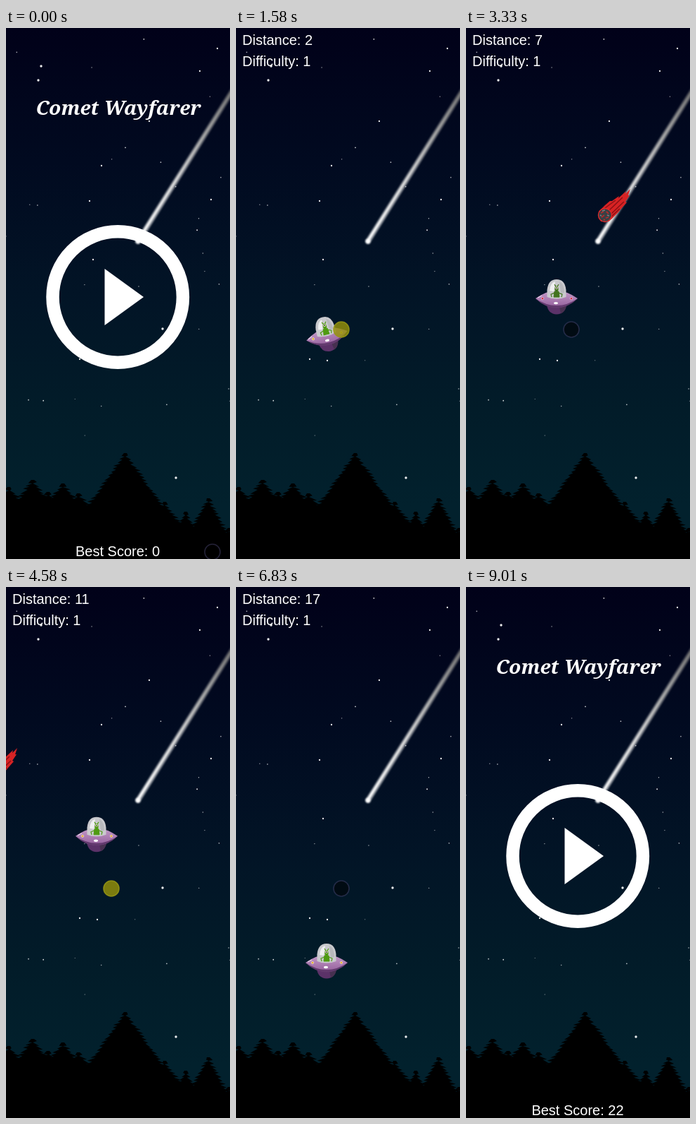
Write an HTML page that moves like this. It is 319 px wide and 752 px high and loops after 9410 ms.

```html
<!DOCTYPE html>
<html lang="en">
<head>
<meta charset="utf-8">
<title>Comet Wayfarer</title>
<style>
  html, body { margin: 0; width: 100%; height: 100%; overflow: hidden; background: #000; }
  svg { display: block; }
  text { font: 20px "Liberation Sans", Arial, sans-serif; fill: #fff; }
  #name { font: italic bold 28px "Noto Serif", serif; }
</style>
</head>
<body>
<svg width="319" height="752" viewBox="0 0 319 752">
  <defs>
    <linearGradient id="sky" x2="0" y2="1">
      <stop offset="0" stop-color="#010119"/>
      <stop offset=".25" stop-color="#010a20"/>
      <stop offset=".5" stop-color="#021426"/>
      <stop offset=".72" stop-color="#021c29"/>
      <stop offset=".9" stop-color="#02212d"/>
    </linearGradient>
    <linearGradient id="tail" gradientUnits="userSpaceOnUse" x1="187" y1="302" x2="321" y2="92">
      <stop offset="0" stop-color="#fff"/>
      <stop offset=".4" stop-color="#ddd"/>
      <stop offset="1" stop-color="#777"/>
    </linearGradient>
    <linearGradient id="hull" x2="0" y2="1">
      <stop offset="0" stop-color="#c49ac8"/>
      <stop offset="1" stop-color="#94609c"/>
    </linearGradient>
    <filter id="soft" filterUnits="userSpaceOnUse" x="0" y="0" width="340" height="752">
      <feGaussianBlur stdDeviation=".9"/>
    </filter>
  </defs>

  <rect width="319" height="752" fill="url(#sky)"/>
  <g id="stars" fill="#fff"></g>
  <g filter="url(#soft)" fill="none" stroke="url(#tail)" stroke-linecap="round">
    <path d="M188 302L328 80" stroke-width="7.5" opacity=".55"/>
    <path d="M188 301L328 80" stroke-width="3.4"/>
    <circle cx="188" cy="302" r="2.2" stroke-width="3"/>
  </g>
  <path id="trees"/>

  <g id="game">
    <g id="rock">
      <path d="M-9-5L0-14 7-20 10-20 20-27 19-24 30-34 29-30 36-37 33-28 35-28 29-19 31-18 23-9 19-4 10 5 5 9-6 9Z" fill="#d82324"/>
      <path d="M5-6L25-25M9-2L27-19M0-10L15-21M8 3L21-9" stroke="#8c1116" stroke-width="1.5"/>
      <circle r="9.5" fill="#394044" stroke="#e5292a" stroke-width="1.3"/>
      <path d="M-6-3L-2-5M2-5L5-2M-5 3L-1 0M1 4L5 3M-2 6L0 7" stroke="#b52a2c" stroke-width="1.8"/>
      <path d="M-4-6L0-7M-7 0L-5 1M3 0L6 1" stroke="#788184" stroke-width="1.5"/>
    </g>
    <g id="ship">
      <path d="M-14 11Q-12 24 0 24.500Q12 24 14 11Z" fill="#5b3268"/>
      <path d="M4 13H14Q12 21 6 23.500Z" fill="#473050"/>
      <path d="M-30 2Q-14-9 0-9Q14-9 30 2Q16 15 0 15Q-16 15-30 2Z" fill="url(#hull)"/>
      <path d="M-30 2Q-16 12 0 12Q16 12 30 2Q16 15.500 0 15.500Q-16 15.500-30 2Z" fill="#633a6e"/>
      <path d="M-13.500 0V-10Q-12-25 0-25Q12-25 13.500-10V0Q0 5-13.500 0Z" fill="#c9c9cd"/>
      <path d="M-10-9Q-9-20-2-22L-4-8Z" fill="#efeff0"/>
      <path d="M4-22Q11-18 11-6L6-5Z" fill="#b7b8bc"/>
      <g id="alien" fill="#4f9a12" stroke="#4f9a12">
        <path d="M-4 0L-3-8H3L4 0Z"/>
        <ellipse cy="-11.500" rx="2.600" ry="4" stroke="none"/>
        <path d="M-3-6L-8-4-7 0M3-6L8-4 7 0M-1-15L-3-18M1-15L3-18" fill="none" stroke-width="1.2"/>
      </g>
      <circle cy="-13" r="1.800" fill="#f4f3d8"/>
      <circle cy="-13" r=".9" fill="#222"/>
      <ellipse cx="-1" cy="8.500" rx="3" ry="1.700" fill="#fff"/>
      <path d="M-27 1L-21-2" stroke="#ead4ec" stroke-width="1.2"/>
      <g id="lamps" stroke="#efd9ee" stroke-width=".6">
        <circle cx="-20" cy="2" r="1.800"/>
        <circle cx="21" cy="2" r="1.800"/>
      </g>
    </g>
    <text id="dist" x="9" y="24"></text>
    <text x="9" y="54">Difficulty: 1</text>
  </g>

  <g id="menu">
    <text id="name" x="160" y="123" text-anchor="middle">Comet Wayfarer</text>
    <circle cx="159.200" cy="381" r="92.700" fill="none" stroke="#fff" stroke-width="18.500"/>
    <path d="M140.500 341L196 381 140.500 421Z" fill="#fff"/>
    <text id="best" x="159" y="748" text-anchor="middle"></text>
  </g>
  <circle id="cursor" r="11" stroke-width="1.600"/>
</svg>

<script>
const $ = id => document.getElementById(id);
const LOOP = 9410, START = 730, OVER = 8720, STEP = 70.17, GRAVITY = 400;
const HOME = [294, 742], SPOT = [150, 427];

// time and height of the ship at each tap; parabolas join them
const PATH = [[700, 347], [1450, 460], [2200, 394], [2700, 397], [3670, 439],
              [4585, 352], [5445, 271], [6910, 566], [8450, 633]];
const TAPS = PATH.slice(1, -1).map(p => p[0]);

const BRIGHT = [[50, 54], [46, 74], [223, 426], [242, 637], [301, 29], [276, 61], [204, 132],
                [136, 195], [119, 245], [292, 243], [124, 328], [105, 469], [130, 471]];
const FAINT = 30;
// x, top and spread of each fir
const FIRS = [[4, 650, .9], [38, 640, .75], [60, 657, .9], [81, 645, .85], [103, 659, .9],
              [170, 602, .72], [226, 671, .7], [256, 685, .6], [288, 666, .55], [318, 708, .8]];

const lerp = (a, b, k) => a + (b - a) * k;
const clamp = v => Math.max(0, Math.min(1, v));

let seed = 11;
const rnd = (a, b) => lerp(a, b, (seed = seed * 16807 % 2147483647) / 2147483647);

function star(x, y, r, opacity) {
  return `<circle cx="${x}" cy="${y}" r="${r}" opacity="${opacity}"/>`;
}

// ragged boughs down both sides of a trunk
function fir([x, top, spread]) {
  const side = dir => {
    const points = [];
    for (let y = top + 3; y < 752; y += rnd(4, 6)) {
      const w = (y - top) * spread;
      points.push(`${x + dir * (w + rnd(1, 5))} ${y + rnd(0, 2)}`, `${x + dir * (w - rnd(1, 3))} ${y + 2}`);
    }
    return points;
  };
  return `M${x - 2} ${top}L${x + 2} ${top} ${side(1).join(" ")} ${x} 752 ${side(-1).reverse().join(" ")}Z`;
}

function drawScene() {
  let dots = BRIGHT.map(([x, y], i) => star(x, y, i < 4 ? 1.7 : 1.15, .92)).join("");
  for (let i = 0; i < FAINT; i++) dots += star(rnd(0, 319), rnd(0, 660), rnd(.5, .95), rnd(.6, .9));
  $("stars").innerHTML = dots;
  $("trees").setAttribute("d", FIRS.map(fir).join("") + "M0 668L200 685 319 722V752H0Z");
}

function shipY(t) {
  const next = PATH.findIndex(p => p[0] > t);
  const i = next < 0 ? PATH.length - 2 : Math.max(0, next - 1);
  const [ta, ya] = PATH[i], [tb, yb] = PATH[i + 1];
  return lerp(ya, yb, (t - ta) / (tb - ta)) - GRAVITY / 2e6 * (t - ta) * (tb - t);
}

function tilt(t) {
  const last = TAPS.findLast(x => x <= t);
  if (last === undefined) return 0;
  const since = t - last;
  return -13 * clamp((since - 15) / 35) * clamp((560 - since) / 240);
}

function place(id, x, y, turn = 0) {
  $(id).setAttribute("transform", `translate(${x} ${y}) rotate(${turn})`);
}

function show(id, on) {
  $(id).style.display = on ? "" : "none";
}

function paint(id, fill, stroke) {
  $(id).setAttribute("fill", fill);
  $(id).setAttribute("stroke", stroke);
}

function render(ms) {
  const n = Math.floor((ms - 648) / STEP);
  const t = n < 0 ? Math.max(0, Math.floor((ms - 4) / 66)) * 66 : 660 + n * STEP;
  const playing = t >= START - 5 && t < OVER;
  show("game", playing);
  show("menu", !playing);
  $("best").textContent = "Best Score: " + (t < START ? 0 : 22);

  if (playing) {
    $("dist").textContent = "Distance: " + Math.max(0, Math.floor((t - 690) / 350));
    place("ship", 129, shipY(t), tilt(t));
    place("rock", 198 - (t - 3326) * .1725, 265);
    const dim = n % 4 > 1, skin = dim ? "#42741f" : "#4f9a12";
    paint("lamps", dim ? "#d3304a" : "#e6b52c", "#efd9ee");
    paint("alien", skin, skin);
  }

  const away = t < 1000 ? 1 - clamp(t / 396) : clamp((t - 8590) / 330);
  const pressed = [655, ...TAPS].some(x => t >= x && t < x + 190);
  place("cursor", lerp(SPOT[0], HOME[0], away), lerp(SPOT[1], HOME[1], away));
  if (pressed) paint("cursor", "rgba(150,145,10,.82)", "rgba(150,150,20,.85)");
  else paint("cursor", "rgba(0,0,0,.5)", "rgba(85,80,130,.42)");
  show("cursor", t < 8990);
}

drawScene();
const begin = performance.now();
function tick() {
  render((performance.now() - begin) % LOOP);
  requestAnimationFrame(tick);
}
tick();
</script>
</body>
</html>
```
